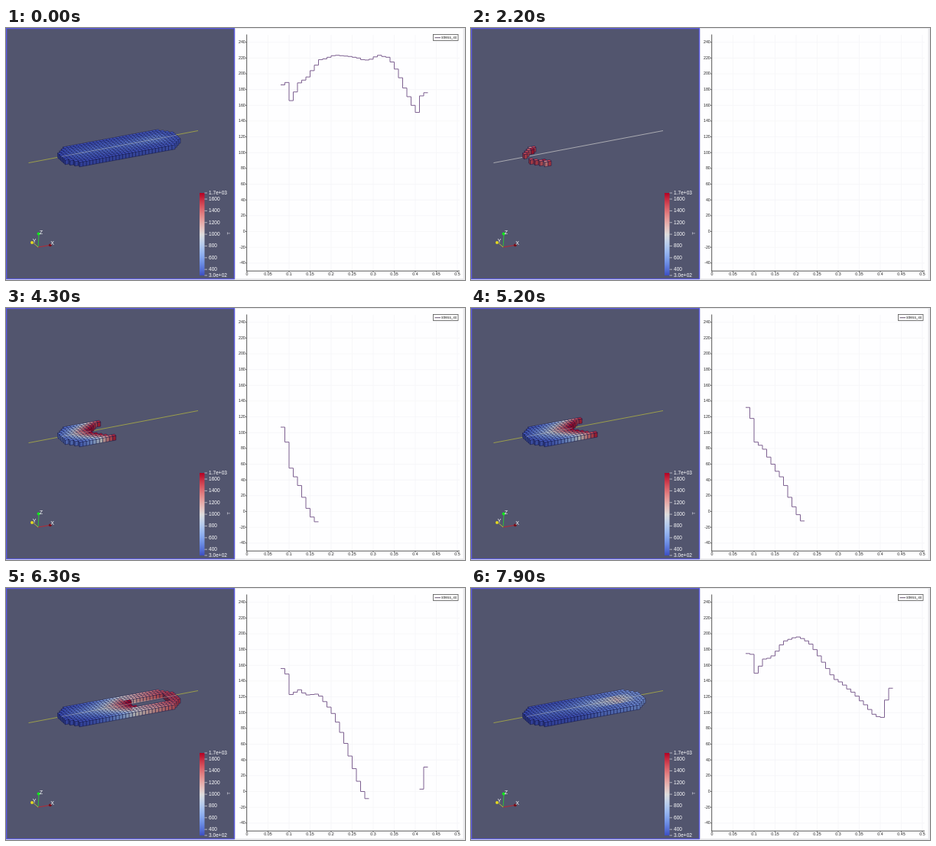
Animation of 600 by 330 pixels, one loop 8 s. Source, as an HTML page with a canvas:

```html
<!DOCTYPE html>
<html lang="en">
<head>
<meta charset="utf-8">
<title>Temperature and stress during deposition</title>
<style>
  html, body { margin: 0; width: 100%; height: 100%; overflow: hidden; background: #e9e9ec; }
  canvas { display: block; width: 600px; height: 330px; }
</style>
</head>
<body>
<canvas id="stage"></canvas>
<script>
const canvas = document.getElementById('stage');
const ratio = window.devicePixelRatio || 1;
canvas.width = 600 * ratio;
canvas.height = 330 * ratio;
const ctx = canvas.getContext('2d');
const FONT = '"Liberation Sans", Arial, sans-serif';

const LOOP = 8000, STEP = 100;
const RESET = 500;      // finished part disappears
const COLS = 35, HALF = 5, RADIUS = 5.5;
const BIRTH_STRESS = -13;

// Stress along the probe line, one value per cell
const COOLED = [186, 189, 166, 177, 188.5, 192, 196, 204, 211, 218, 219, 221, 223, 223.5, 223, 222.5, 222, 221,
  220, 218, 217.5, 218.5, 221.5, 223.5, 222, 221, 215, 206, 195, 182, 171, 160, 151, 172, 176];
const PROFILES = [
  { t: 2200, v: [] },
  { t: 3200, v: [59, 31, -2, -12] },
  { t: 4300, v: [107, 88, 55, 44, 33, 18, 4, -7, -13] },
  { t: 5200, v: [132, 118, 88, 84, 79, 69, 60, 51, 44, 33, 18, 6, -4, -12] },
  { t: 6300, v: [156, 149, 123, 126, 129, 125, 122.5, 123, 123.5, 121, 114, 107, 99, 88, 75, 61, 45, 29, 13, 0, -9], tail: [3, 31] },
  { t: 7900, v: [175, 174, 150, 159, 168, 169, 172, 178, 186, 191, 193, 195, 196, 194, 191, 187, 180, 172,
    164, 156, 148, 142, 139, 135, 130, 126, 121, 115, 110, 104, 98, 95, 94, 116, 131] }
];

const lerp = (a, b, p) => a + (b - a) * p;
const clamp = (x, a, b) => Math.min(b, Math.max(a, x));

// Time at which the deposit on the centre row reaches column u
const FRONT = [[0, 2300], [3, 3150], [8, 4250], [13, 5150], [20, 6270], [27, 6950], [34, 6180]];
function frontTime(u) {
  let k = 1;
  while (k < FRONT.length - 1 && u > FRONT[k][0]) k++;
  const [u0, t0] = FRONT[k - 1], [u1, t1] = FRONT[k];
  return lerp(t0, t1, (u - u0) / (u1 - u0));
}

function buildCells() {
  const list = [];
  for (let i = COLS - 1; i >= 0; i--) {
    for (let j = HALF; j >= -HALF; j--) {
      const x = i + 0.5;
      const r = Math.hypot(Math.max(0, RADIUS - x, x - (COLS - RADIUS)), j);
      if (r > RADIUS) continue;
      const lead = 5 * Math.pow(Math.abs(j) / HALF, 1.7);
      let born = frontTime(i <= 27 ? i - lead : Math.min(34, i + lead));
      // the rim runs ahead and closes the far end
      if (r > 2.9 && i > 19) born = Math.min(born, 5400 + (i - 20) * 55);
      list.push({ i, j, r, born });
    }
  }
  return list;
}
const cells = buildCells();
const key = (i, j) => i * 20 + j + HALF;

function heatColor(h, shade = 1) {
  const cool = [59, 76, 192], mid = [221, 221, 221], hot = [180, 4, 38];
  h = clamp(h, 0, 1);
  const [a, b, p] = h < 0.5 ? [cool, mid, h * 2] : [mid, hot, h * 2 - 1];
  // bow the ramp outwards for the softer blues and reds
  const bow = 24 * 4 * p * (1 - p);
  const add = h < 0.5 ? [0, bow, bow * 1.3] : [bow, bow * 0.6, 0];
  return 'rgb(' + a.map((c, k) => Math.round(Math.min(255, lerp(c, b[k], p) + add[k]) * shade)).join(',') + ')';
}

function line(x0, y0, x1, y1, color, width = 1) {
  ctx.strokeStyle = color;
  ctx.lineWidth = width;
  ctx.beginPath();
  ctx.moveTo(x0, y0);
  ctx.lineTo(x1, y1);
  ctx.stroke();
}

function text(s, x, y, size, color, align = 'left') {
  ctx.font = size + 'px ' + FONT;
  ctx.fillStyle = color;
  ctx.textAlign = align;
  ctx.textBaseline = 'middle';
  ctx.fillText(s, x, y);
}

function dot(x, y, r, color) {
  ctx.fillStyle = color;
  ctx.beginPath();
  ctx.arc(x, y, r, 0, Math.PI * 2);
  ctx.fill();
}

function quad(points, fill) {
  ctx.beginPath();
  points.forEach(([x, y]) => ctx.lineTo(x, y));
  ctx.closePath();
  ctx.fillStyle = fill;
  ctx.fill();
  ctx.stroke();
}

const project = (u, v) => [72.5 + 4.3 * u - 2 * v, 168.3 - 0.8 * u - 1.8 * v];
const drop = ([x, y]) => [x, y + 6];

function drawPart(t) {
  const done = t < RESET;
  const live = cells.filter(c => done || t >= c.born);
  const filled = new Set(live.map(c => key(c.i, c.j)));
  ctx.strokeStyle = 'rgba(16,18,66,0.85)';
  ctx.lineWidth = 0.55;
  ctx.lineJoin = 'round';
  for (const { i, j, r, born } of live) {
    const age = (done ? t + LOOP + 1500 : t) - born;
    const h = 0.93 * Math.exp(-Math.pow(age / 1300, 1.3)) + 0.11 * (1 - r / 6);
    const a = project(i, j - 0.5), b = project(i + 1, j - 0.5);
    const c = project(i + 1, j + 0.5), d = project(i, j + 0.5);
    if (!filled.has(key(i - 1, j))) quad([a, d, drop(d), drop(a)], heatColor(h, 0.66));
    if (!filled.has(key(i, j - 1))) quad([a, b, drop(b), drop(a)], heatColor(h, 0.76));
    quad([a, b, c, d], heatColor(h));
  }
}

function drawTriad() {
  line(42, 287, 43, 270, '#2fbf3a');
  line(42, 287, 57, 284.5, '#b52a35');
  line(42, 287, 36, 281.5, '#b8b83a');
  dot(42.7, 269.5, 2.1, '#14e61e');
  dot(57.8, 284.3, 1.9, '#7a0d18');
  dot(34, 281, 1.9, '#e6dc1e');
  text('Z', 46, 268, 7, '#fff', 'center');
  text('X', 60.5, 282.5, 7, '#fff', 'center');
  text('Y', 37, 279, 7, '#fff', 'center');
}

function drawColorBar() {
  for (let y = 216; y < 324; y++) {
    ctx.fillStyle = heatColor(1 - (y - 216) / 108);
    ctx.fillRect(253, y, 6.5, 1.05);
  }
  const mark = (label, y) => {
    line(259.5, y, 263, y, '#d8d8e0', 0.7);
    text(label, 265, y, 6.6, '#fff');
  };
  mark('1.7e+03', 216);
  for (let v = 1600; v >= 400; v -= 200) mark(String(v), 224 + (1600 - v) * 0.0768);
  mark('3.0e+02', 324);
  ctx.save();
  ctx.translate(291.5, 269);
  ctx.rotate(-Math.PI / 2);
  text('T', 0, 0, 6, '#dcdce4', 'center');
  ctx.restore();
}

function drawScene(t) {
  ctx.fillStyle = '#52556e';
  ctx.fillRect(0, 0, 298.5, 329);
  const probed = t < RESET || t >= FRONT[0][1];
  line(29.5, 176.6, 251, 134.5, probed ? '#a3a548' : '#b4b4b8', 0.9);
  drawPart(t);
  if (probed) {
    // the probe shows faintly through the part
    const end = t < RESET ? COLS : Math.max(0, ...cells.filter(c => c.j === 0 && t >= c.born).map(c => c.i + 1));
    const [x0, y0] = project(0, 0), [x1, y1] = project(end, 0);
    line(x0, y0, x1, y1, 'rgba(215,220,215,0.4)', 0.9);
  }
  drawTriad();
  drawColorBar();
  ctx.strokeStyle = '#5a5ae0';
  ctx.lineWidth = 1.4;
  ctx.strokeRect(0.6, 0.6, 297.9, 328);
}

const plotX = x => 315 + x * 550;
const plotY = v => 266.5 - v * 1.0325;

function profileValue(p, i) {
  if (p.tail && i >= COLS - 2) return p.tail[i - COLS + 2];
  return p.v[i];
}

function stressAt(i, t) {
  if (t < RESET) return COOLED[i] + t * 0.002;
  const born = frontTime(i);
  if (t < born) return null;
  let k = PROFILES.findIndex(p => p.t >= t);
  if (k < 0) k = PROFILES.length - 1;
  const next = PROFILES[k], prev = PROFILES[Math.max(0, k - 1)];
  const to = profileValue(next, i), from = profileValue(prev, i);
  if (to === undefined) return BIRTH_STRESS;
  if (from !== undefined) return lerp(from, to, (t - prev.t) / (next.t - prev.t));
  return lerp(BIRTH_STRESS, to, Math.pow((t - born) / Math.max(1, next.t - born), 0.6));
}

function drawChart(t) {
  ctx.fillStyle = '#fefeff';
  ctx.fillRect(300, 1, 297.5, 327);
  for (let k = 0; k <= 10; k++) {
    const x = plotX(k * 0.05);
    if (k) line(x, 9, x, 318, '#f5f5f8', 0.8);
    line(x, 318, x, 320, '#444', 0.7);
    text(String(+(k * 0.05).toFixed(2)), x, 322.6, 5.3, '#222', 'center');
  }
  for (let v = -40; v <= 240; v += 20) {
    const y = plotY(v);
    line(315, y, 593, y, '#f5f5f8', 0.8);
    line(313, y, 315, y, '#444', 0.7);
    text(String(v), 312.8, y, 5.3, '#222', 'right');
  }
  line(314.7, 8.5, 314.7, 318.5, '#444', 0.9);
  line(314.5, 318.2, 593, 318.2, '#444', 0.9);

  if (t >= RESET && t < FRONT[0][1]) return;
  ctx.beginPath();
  let open = false;
  for (let i = 0; i < COLS; i++) {
    const s = stressAt(i, t);
    if (s === null) { open = false; continue; }
    const x = plotX(0.08 + i * 0.01), y = plotY(s);
    if (open) ctx.lineTo(x, y); else ctx.moveTo(x, y);
    ctx.lineTo(x + 5.5, y);
    open = true;
  }
  ctx.strokeStyle = '#7d6090';
  ctx.lineWidth = 1;
  ctx.lineJoin = 'miter';
  ctx.stroke();

  ctx.fillStyle = '#fff';
  ctx.fillRect(558.5, 8.5, 32.5, 8);
  ctx.strokeStyle = '#555';
  ctx.lineWidth = 0.8;
  ctx.strokeRect(558.5, 8.5, 32.5, 8);
  line(560.5, 12.7, 568, 12.7, '#55405f', 0.9);
  text('stress_xx', 569, 12.3, 4.8, '#222');
}

function frame(now) {
  const t = Math.floor((now % LOOP) / STEP) * STEP;
  ctx.setTransform(ratio, 0, 0, ratio, 0, 0);
  ctx.fillStyle = '#e9e9ec';
  ctx.fillRect(0, 0, 600, 330);
  drawScene(t);
  drawChart(t);
  requestAnimationFrame(frame);
}
frame(0);
</script>
</body>
</html>
```
